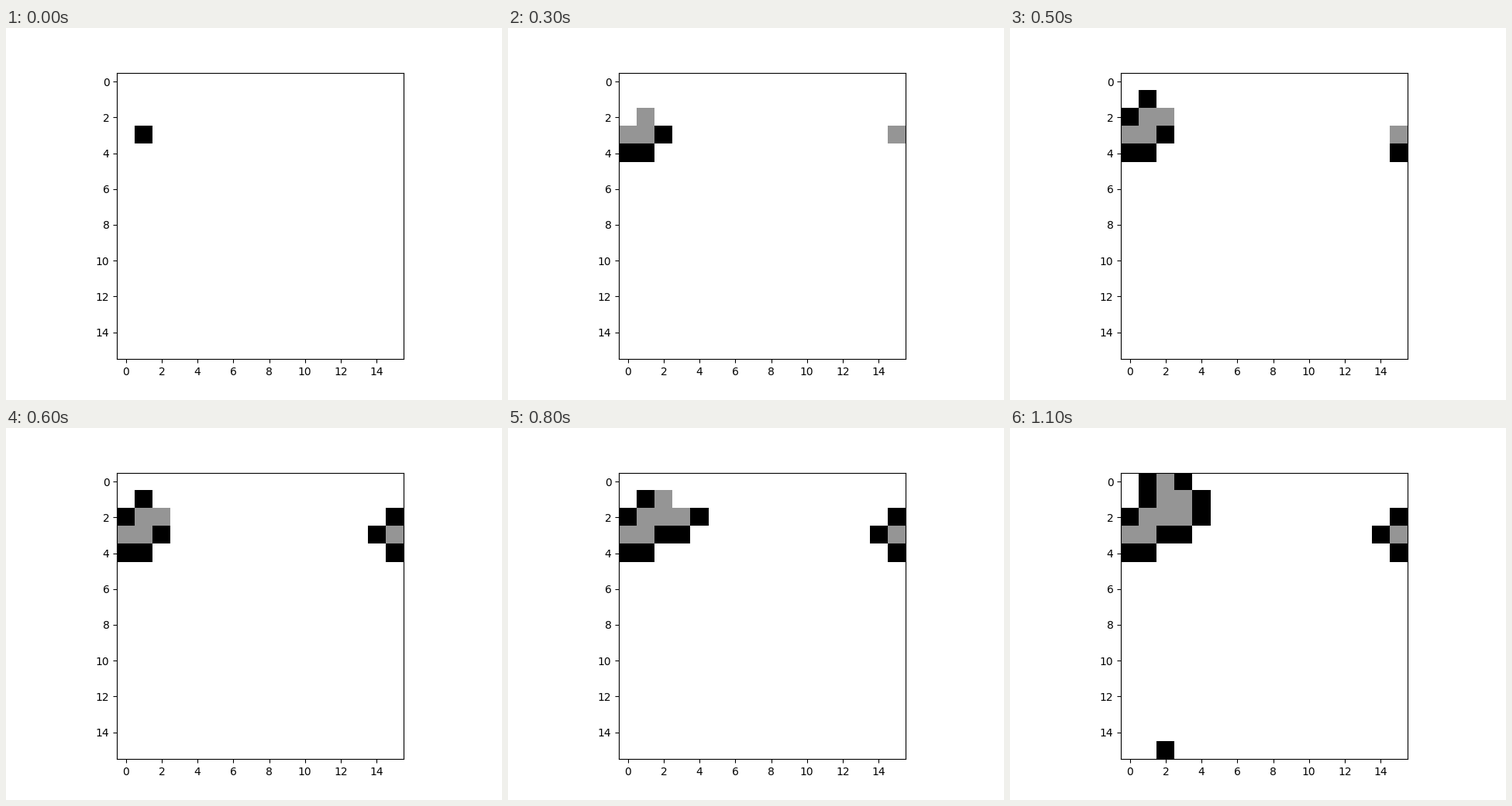
Animation, 640 px wide and 480 px high, one loop 1650 ms. Source, as a matplotlib script:

```python
import numpy as np
import matplotlib.pyplot as plt
from matplotlib.animation import FuncAnimation

SIZE = 16
STEP_MS, LOOP_MS = 50, 1650
START = (1, 3)
MOVES = [(1, 0), (0, 1), (-1, 0), (0, -1)]


def is_open(x, y):
    """Open cells form a band that curves left and widens as y grows."""
    left = 2 - y * (y - 1) // 2
    return (x - left) % SIZE <= min(y, 2)


def explore():
    """Breadth-first walk on a wrapping grid, listing cells as they are found."""
    found, queue = [START], [START]
    while queue:
        x, y = queue.pop(0)
        for dx, dy in MOVES:
            cell = ((x + dx) % SIZE, (y + dy) % SIZE)
            if cell not in found:
                found.append(cell)
                if is_open(*cell):
                    queue.append(cell)
    return found


cells = explore()


def grid_at(i):
    grid = np.zeros((SIZE, SIZE))
    for x, y in cells[:i + 1]:
        grid[y, x] = 1 if is_open(x, y) else 2
    return grid


fig, ax = plt.subplots(figsize=(6.4, 4.8), dpi=100)
image = ax.imshow(grid_at(0), cmap="Greys")


def update(i):
    grid = grid_at(i)
    image.set_data(grid)
    image.set_clim(0, grid.max())
    return [image]


anim = FuncAnimation(fig, update, frames=LOOP_MS // STEP_MS,
                     interval=STEP_MS, repeat=True, repeat_delay=0)
plt.show()
```
